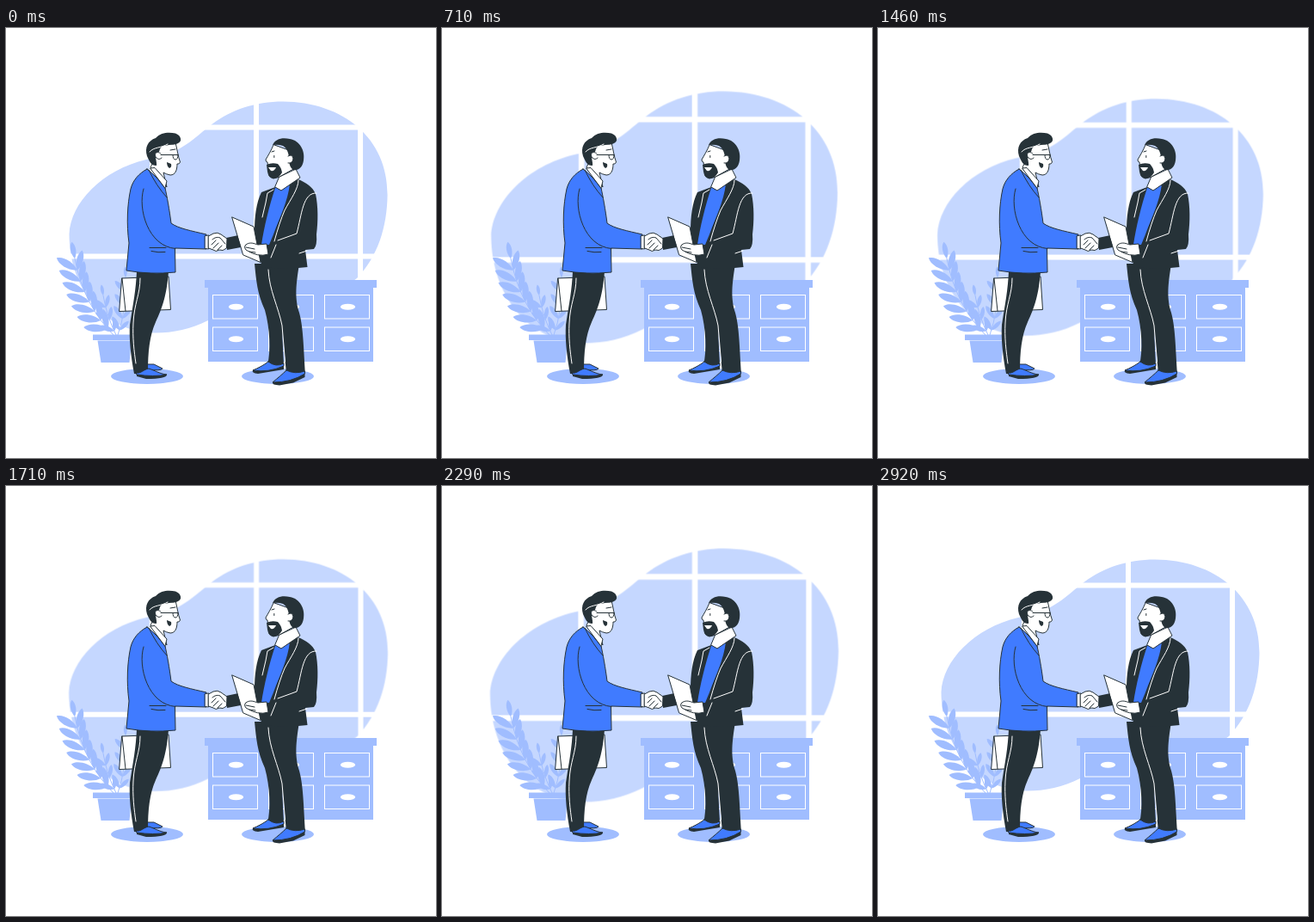
Recreate the animation shown at these times as an HTML page. Size 500x500 px, loop 2.96 s.

```html
<!DOCTYPE html>
<html lang="en">
<head>
<meta charset="utf-8">
<title>Handshake</title>
<style>
  html, body { margin: 0; width: 100%; height: 100%; overflow: hidden; background: #fff; }
  svg { display: block; width: 100%; height: 100%; }
  path { stroke-linecap: round; stroke-linejoin: round; }
  .pale { fill: #c5d7ff; }
  .mid { fill: #a0bdff; }
  .blue { fill: #407bff; }
  .dark { fill: #263238; }
  .white { fill: #fff; }
  .line { stroke: #263238; }
  .light { stroke: #fff; }
  .bare { fill: none; }
  .stem { fill: none; stroke: #a0bdff; }
  .bars { fill: none; stroke: #fff; stroke-width: 6; }
  .window {
    transform-origin: 258.5px 220px;
    animation: swell 2960ms linear infinite;
  }
  /* quick rise, slow fall, quick rise, quick fall, short rest */
  @keyframes swell {
    0%, 58.784%, 98.649%, 100% { transform: scale(1); }
    19.595%, 78.378% { transform: scale(1.1); }
  }
</style>
</head>
<body>
<svg viewBox="0 0 500 500">
  <g class="window">
    <path class="pale" d="M73.500 240C75 203 112 165 163 153C205 146 218 128 240 111.500C262 95 290 85.500 322 85.500C392 86 444 128 443.500 194C443 232 432 266 408 291C380 312 300 305 235 340C215 350 195 354.500 173 354.500C115 354 74 305 73.500 240Z"/>
    <path class="bars" d="M170 115V269M291 80V266M412 115.500V300M225 115.500H415M66 265.500H450"/>
  </g>

  <g id="plant" class="mid">
    <path d="M101 356.500H150V363H101ZM106.500 363.500H146L143.500 389H110.500Z"/>
  </g>

  <g id="cabinet">
    <path class="mid" d="M231 293H431V302H427V388H235V302H231Z"/>
  </g>

  <g class="mid">
    <ellipse cx="164" cy="405" rx="42" ry="9"/>
    <ellipse cx="316" cy="405" rx="42" ry="9"/>
  </g>

  <!-- man in the blue jacket -->
  <g>
    <path class="white line" d="M135 291L189 289L191.500 327.500L132 329.500ZM135 291L139 329"/>
    <path class="blue line" d="M164 391H172L182 396Q181 399 164 397Z"/>
    <path class="dark" d="M152 283H189C187 310 182 325 174 342C167 358 165 375 165 402H149C145 380 143 362 144 345C148 320 151 305 152 283Z"/>
    <path class="bare light" d="M156 291C156 310 149 320 148 343C147 360 149 376 151 390"/>
    <path class="dark" d="M152 401L187 403Q187 408 163 408L152 405Z"/>
    <path class="blue line" d="M152 401C157 402 160 397 166 396C173 398 178 402 187 403Q172 406 152 403Z"/>

    <path class="white line" d="M178 137C186 137 192 135 197 133C199 141 200 149 202.500 156Q201 159 199 158C199 165 197 171 191 171Q186 170 183 168L187 185L168 162L174 150Z"/>
    <path class="dark" d="M164 149C161 139 165 131 174 128C180 121 190 121 197 122.500C204 125 205 132 200 134C193 138 186 133 180 139C178 142 179 144 176 146C172 149 176 156 175 160C168 160 167 155 164 149Z"/>
    <path class="white line" d="M180 146C175 142 171 147 175 151Q178 154 181 151"/>
    <path class="bare light" d="M167 144C172 138 180 140 188 135"/>
    <path class="bare line" d="M180 147.500H200M194 147.500Q194 153 197 153Q200 153 200 147.500M191 142L197 141"/>
    <path class="dark" d="M187 156L192 158Q193 162 190 163Q187 161 187 156Z"/>

    <path class="blue line" d="M164 164C155 169 148 176 145 187C141 205 140 228 143 250L140 282Q168 287 197 284L196.500 256L233 257V240C216 236 200 233 192 227C190 211 187 195 185 186C178 177 172 170 164 164Z"/>
    <path class="white line" d="M168 163L173 162.500L187 178L185 186Z"/>
    <path class="bare line" d="M160 187C153 210 165 254 197 256.500M166 165Q175 184 187 197M167 255.500H186M169 259.500Q177 261.500 185 260.500"/>
    <path class="white line" d="M231.500 241.500L236 241L235.500 257L231.500 256.500Z"/>
  </g>

  <!-- man in the dark suit -->
  <g>
    <path class="dark" d="M289 274H341C337 300 336 312 340 328C346 345 346 375 348 402H326L321 350L323 392H304C308 375 307 350 301 328C292 308 291 294 289 274Z"/>
    <path class="bare light" d="M305 281C306 305 317 325 321 346L324.500 388"/>
    <path class="dark" d="M287 398L323 392V397L293 402Q285 401 287 398ZM310 412L347.500 401V406L334 412.500L318 415.500Q309 415 310 412Z"/>
    <path class="blue line" d="M305 388C300 392 292 396 287 398Q305 401 323 393V390Q314 395 305 388ZM326 398C321 403 316 407 310 412Q332 412 347.500 402V399Q336 403 326 398Z"/>

    <path class="dark" d="M256 244L275 240L289 238C289 219 291 203 297 191L313 185L340 176C349 180 357 185 360 193C363 207 363 225 361 240Q362 253 358 257L348 258L350.500 278Q324 281 298 278L293 262L273 255L257 258Z"/>
    <path class="blue" d="M313 186L330 181C328 201 318 221 311 240L306 252H297C300 232 306 207 313 186Z"/>
    <path class="white line" d="M318 173L337 164L342 174L320 189L313 185Z"/>
    <path class="bare light" d="M340 177C340 187 331 199 324 212Q318 226 312 248M311 188L304 192L302 203L298 220M361 192C345 191 344 217 338 239L316 247M350 259L341 262M314 252L308 267"/>

    <path class="white line" d="M311 136C308 143 305 148 302 153Q302 156 304 156L306 172Q312 176 318 173L336 163V145Z"/>
    <path class="dark" d="M310 136C313 129 321 127 330 129C342 131 348 143 346 154C345 162 340 166 334 165C330 162 329 157 329 152C329 146 327 140 322 137Q316 135 310 136Z"/>
    <path class="white line" d="M328 149Q333 146 334 152Q333 158 328 157"/>
    <path class="dark" d="M303 159Q309 156 316 158Q320 162 321 168Q317 175 311 175.500Q305 174 304 167Z"/>
    <path class="white" d="M305 162H314Q312 167 308 166Z"/>
    <path class="bare line" d="M309 144L312 143M311.800 148.500V150.500"/>

    <path class="white line" d="M263 220L288 231L296 272.500L276 264Z"/>
    <path class="white line" d="M279 252C284 248 289 251 293 252L303 251L305 263Q293 267 279 258Q276 254 279 252Z"/>
    <path class="bare line" d="M279 255L289 257M283 260L290 261"/>
  </g>

  <!-- joined hands -->
  <path class="white line" d="M235.500 242L241 239Q246 237 250 240L257 245L256.500 256Q252 260 248 258Q244 261 241 258L235.500 256Z"/>
  <path class="bare line" d="M240 246Q244 242 249 244L255 251M239 252L244 247M241 256L247 250M246 258L251 253"/>
</svg>
<script>
  const add = (parent, tag, attrs) => {
    const el = document.createElementNS("http://www.w3.org/2000/svg", tag);
    for (const key in attrs) el.setAttribute(key, attrs[key]);
    parent.append(el);
  };

  const cabinet = document.getElementById("cabinet");
  for (let i = 0; i < 6; i++) {
    const x = 240.5 + 65 * (i % 3), y = i < 3 ? 310.5 : 348;
    add(cabinet, "rect", { x, y, width: 52, height: 27.5, class: "bare light" });
    add(cabinet, "ellipse", { cx: x + 27, cy: y + 13.7, rx: 8.7, ry: 3.5, class: "white" });
  }

  const plant = document.getElementById("plant");

  function leaf(x, y, angle, len) {
    const w = len * .21;
    add(plant, "path", {
      d: `M0 0C${len * .3} ${-w} ${len * .8} ${-w} ${len} 0C${len * .8} ${w} ${len * .3} ${w} 0 0Z`,
      transform: `translate(${x} ${y}) rotate(${angle})`
    });
  }

  // A curved stem with pairs of leaves and one at the tip.
  function frond([x0, y0], [x1, y1], [x2, y2], pairs, len) {
    add(plant, "path", { class: "stem", d: `M${x0} ${y0}Q${x1} ${y1} ${x2} ${y2}` });
    const mix = (a, b, c, t) => (1 - t) ** 2 * a + 2 * t * (1 - t) * b + t * t * c;
    const slope = (a, b, c, t) => (1 - t) * (b - a) + t * (c - b);
    for (let i = 0; i <= pairs; i++) {
      const t = .1 + .9 * i / pairs;
      const x = mix(x0, x1, x2, t), y = mix(y0, y1, y2, t);
      const angle = Math.atan2(slope(y0, y1, y2, t), slope(x0, x1, x2, t)) * 180 / Math.PI;
      if (i === pairs) leaf(x, y, angle, len * .7);
      else {
        leaf(x, y, angle - 45, len);
        leaf(x, y, angle + 28, len * .85);
      }
    }
  }

  frond([125, 357], [90, 322], [80, 268], 7, 28);
  frond([128, 357], [117, 335], [113, 311], 3, 18);
  frond([130, 357], [140, 330], [139, 290], 4, 18);
</script>
</body>
</html>
```
